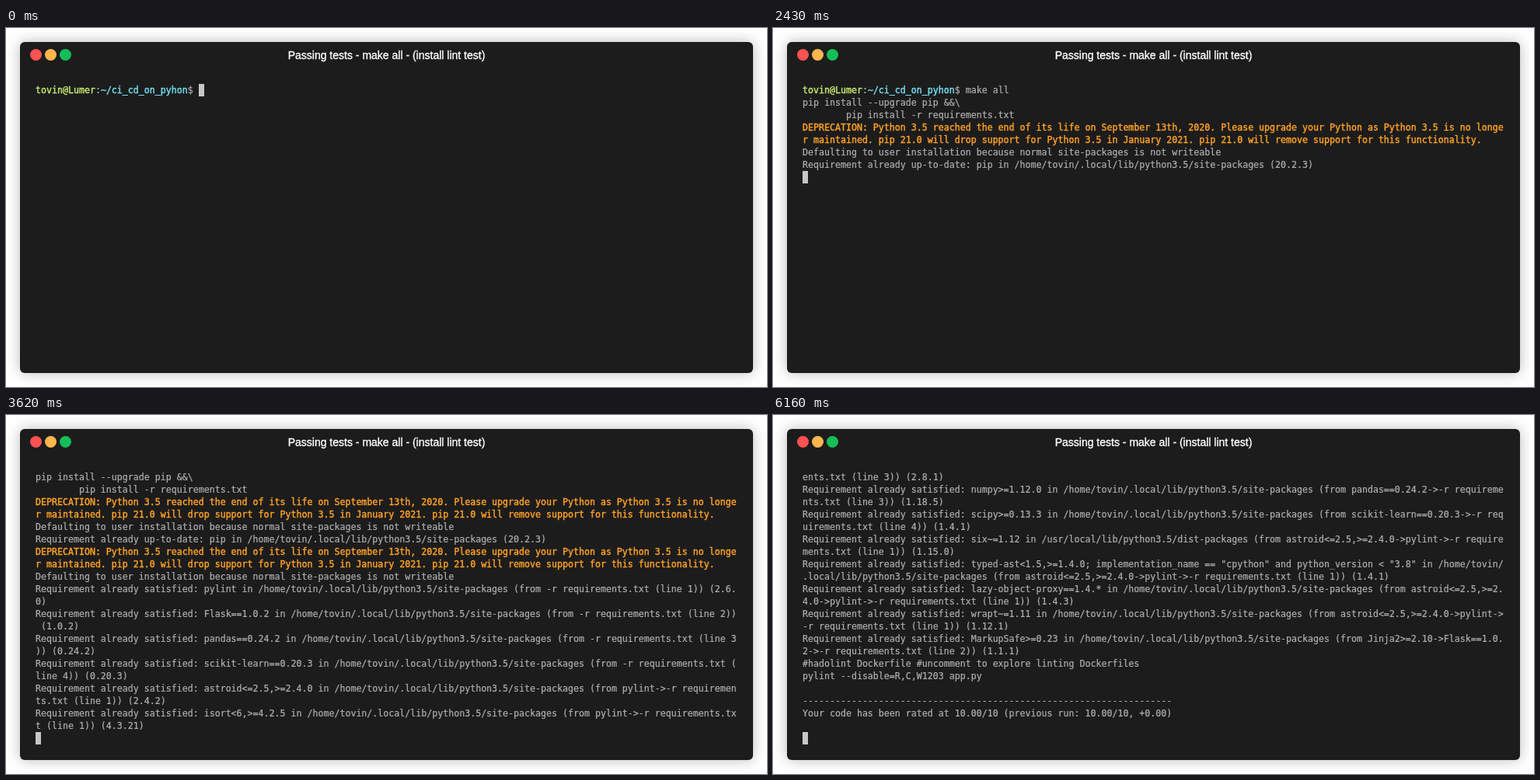
An HTML page that plays this animation: 979 px wide and 462 px high, repeating every 8000 ms.

```html
<!DOCTYPE html>
<html lang="en">
<head>
<meta charset="utf-8">
<title>Terminal</title>
<style>
html, body { margin: 0; width: 100%; height: 100%; overflow: hidden; background: #fff; }
#win {
  position: absolute; left: 18px; top: 18px; width: 943px; height: 426px;
  border-radius: 6px; background: #1c1c1c; box-shadow: 0 0 18px rgba(0, 0, 0, .28);
}
#title {
  position: absolute; left: 0; right: 0; top: 9px; text-align: center;
  font: 14px/16px "Liberation Sans", Arial, sans-serif; color: #fff;
  -webkit-text-stroke: .35px;
}
.dot { position: absolute; top: 9px; width: 15px; height: 15px; border-radius: 50%; }
#term {
  position: absolute; left: 20px; top: 54px; margin: 0; color: #afafaf;
  font: 11.627px/16px "DejaVu Sans Mono", monospace; font-variant-ligatures: none;
  -webkit-text-stroke: .22px;
}
#cursor { position: absolute; width: 7px; height: 16px; background: #c7c7c7; }
.user, .path, .warn { -webkit-text-stroke: .4px; }
.user { color: #c8ed71; }
.path { color: #75dff2; }
.warn { color: #ffa227; }
</style>
</head>
<body>
<div id="win">
  <div class="dot" style="left:13px;background:#ff5252"></div>
  <div class="dot" style="left:32px;background:#ffb64d"></div>
  <div class="dot" style="left:51px;background:#16be57"></div>
  <div id="title">Passing tests - make all - (install lint test)</div>
  <pre id="term"></pre>
  <div id="cursor"></div>
</div>
<script>
const LOOP = 8000, COLS = 129, ROWS = 22, CELL_W = 7, CELL_H = 16, LEFT = 20, TOP = 54;
const COMMAND = "make all";
const KEY_TIMES = [500, 590, 730, 890, 1000, 1210, 1340, 1490];
const PROMPT = [["tovin@Lumer", "user"], [":", ""], ["~/ci_cd_on_pyhon", "path"], ["$ ", ""]];
const PROMPT_LEN = PROMPT.reduce((n, [text]) => n + text.length, 0);

const HOME = "/home/tovin/.local/lib/python3.5/site-packages";
const DIST = "/usr/local/lib/python3.5/dist-packages";
const DEPRECATION = "!DEPRECATION: Python 3.5 reached the end of its life on September 13th, 2020. " +
  "Please upgrade your Python as Python 3.5 is no longer maintained. pip 21.0 will drop support " +
  "for Python 3.5 in January 2021. pip 21.0 will remove support for this functionality.";
const DEFAULTING = "Defaulting to user installation because normal site-packages is not writeable";

const PYLINT = "pylint->", FLASK = "Flask==1.0.2->", PANDAS = "pandas==0.24.2->";
const ASTROID = "astroid<=2.5,>=2.4.0->pylint->";
const req = (spec, via, line, version, dir = HOME) =>
  `Requirement already satisfied: ${spec} in ${dir} (from ${via}-r requirements.txt (line ${line})) (${version})`;

// Output by time; a leading "!" marks a warning
const OUTPUT = [
  [1800, "pip install --upgrade pip &&\\", "        pip install -r requirements.txt"],
  [2160, DEPRECATION, DEFAULTING],
  [2430, `Requirement already up-to-date: pip in ${HOME} (20.2.3)`],
  [3180, DEPRECATION, DEFAULTING],
  [3280, req("pylint", "", 1, "2.6.0")],
  [3350, req("Flask==1.0.2", "", 2, "1.0.2")],
  [3420, req("pandas==0.24.2", "", 3, "0.24.2")],
  [3490, req("scikit-learn==0.20.3", "", 4, "0.20.3")],
  [3550, req("astroid<=2.5,>=2.4.0", PYLINT, 1, "2.4.2")],
  [3620, req("isort<6,>=4.2.5", PYLINT, 1, "4.3.21")],
  [3720,
    req("mccabe<0.7,>=0.6", PYLINT, 1, "0.6.1"),
    req("toml>=0.7.1", PYLINT, 1, "0.10.1"),
    req("itsdangerous>=0.24", FLASK, 2, "1.1.0"),
    req("Jinja2>=2.10", FLASK, 2, "2.11.2"),
    req("click>=5.1", FLASK, 2, "7.1.2"),
    req("Werkzeug>=0.14", FLASK, 2, "1.0.1"),
    req("pytz>=2011k", PANDAS, 3, "2020.1")],
  [3820,
    req("python-dateutil>=2.5.0", PANDAS, 3, "2.8.1", DIST),
    req("numpy>=1.12.0", PANDAS, 3, "1.18.5"),
    req("scipy>=0.13.3", "scikit-learn==0.20.3->", 4, "1.4.1"),
    req("six~=1.12", ASTROID, 1, "1.15.0", DIST),
    req('typed-ast<1.5,>=1.4.0; implementation_name == "cpython" and python_version < "3.8"', ASTROID, 1, "1.4.1"),
    req("lazy-object-proxy==1.4.*", ASTROID, 1, "1.4.3"),
    req("wrapt~=1.11", ASTROID, 1, "1.12.1"),
    req("MarkupSafe>=0.23", "Jinja2>=2.10->" + FLASK, 2, "1.1.1")],
  [4160, "#hadolint Dockerfile #uncomment to explore linting Dockerfiles", "pylint --disable=R,C,W1203 app.py"],
  [6160, "", "-".repeat(68), "Your code has been rated at 10.00/10 (previous run: 10.00/10, +0.00)", ""]
];

const term = document.getElementById("term");
const cursor = document.getElementById("cursor");

// Split one logical line into rows of [text, class] parts
function wrap(line) {
  const style = line[0] === "!" ? "warn" : "";
  const text = style ? line.slice(1) : line;
  const rows = [];
  for (let i = 0; i === 0 || i < text.length; i += COLS) rows.push([[text.slice(i, i + COLS), style]]);
  return rows;
}

function span([text, style]) {
  const el = document.createElement("span");
  el.className = style;
  el.textContent = text;
  return el;
}

function draw(typed, blocks) {
  const rows = [[...PROMPT, [COMMAND.slice(0, typed), ""]]];
  for (const [, ...lines] of OUTPUT.slice(0, blocks))
    for (const line of lines) rows.push(...wrap(line));
  if (blocks) rows.push([]);
  const view = rows.slice(-ROWS);
  term.replaceChildren(...view.flatMap(row => [...row.map(span), "\n"]));
  cursor.style.left = LEFT + (blocks ? 0 : PROMPT_LEN + typed) * CELL_W + "px";
  cursor.style.top = TOP + (view.length - 1) * CELL_H + "px";
}

let shown = "";
function tick() {
  const t = performance.now() % LOOP;
  const typed = KEY_TIMES.filter(k => k <= t).length;
  const blocks = OUTPUT.filter(([at]) => at <= t).length;
  const state = typed + "/" + blocks;
  if (state !== shown) {
    draw(typed, blocks);
    shown = state;
  }
  requestAnimationFrame(tick);
}
tick();
</script>
</body>
</html>
```
